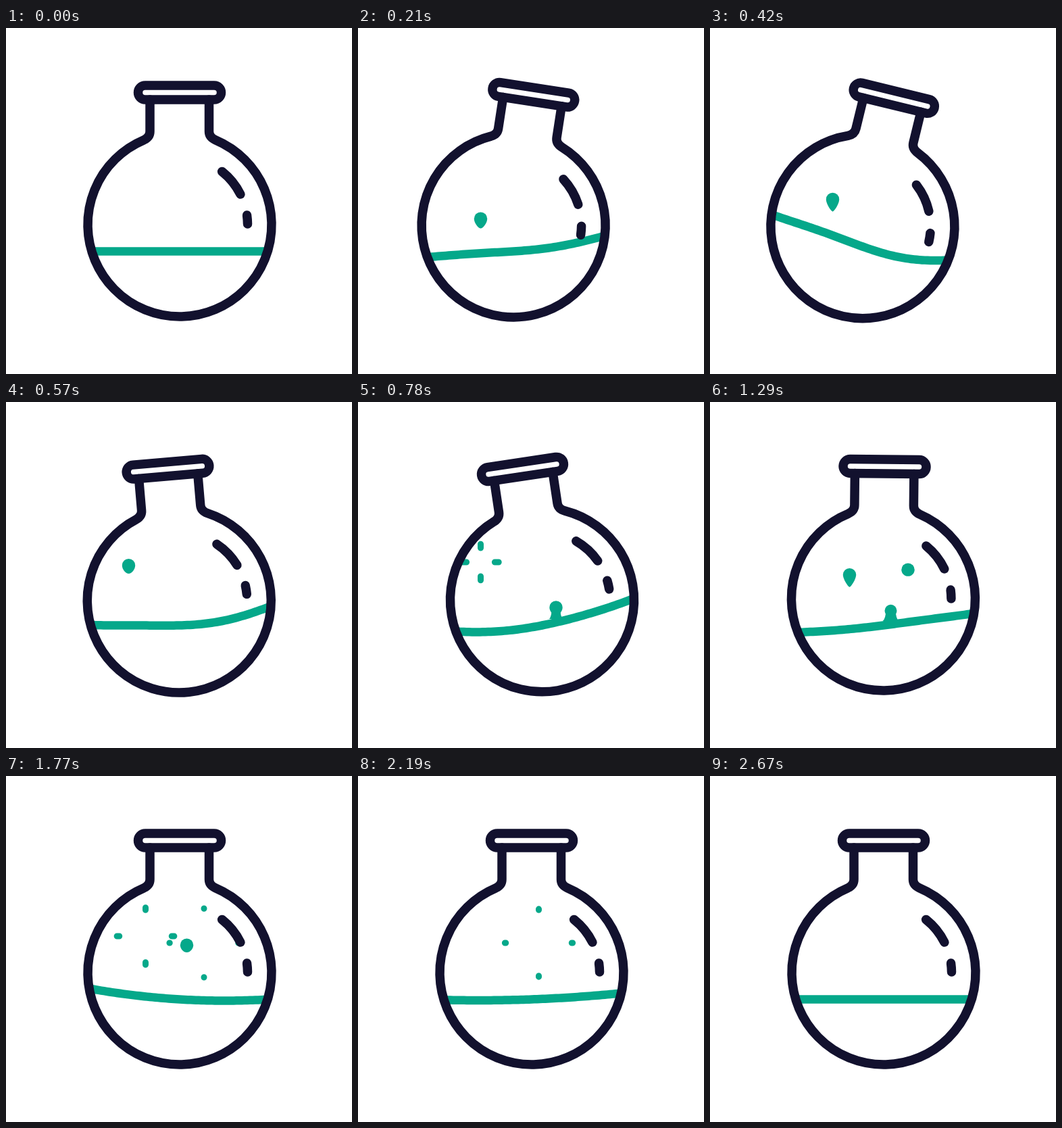
Animation of 512 by 512 pixels, one loop 3200 ms. Source, as an HTML page with a canvas:

```html
<!DOCTYPE html>
<html lang="en">
<head>
<meta charset="utf-8">
<title>Flask</title>
<style>
  html, body { margin: 0; width: 100%; height: 100%; overflow: hidden; background: #fff; }
  canvas { display: block; width: 512px; height: 512px; }
</style>
</head>
<body>
<canvas id="stage" width="512" height="512"></canvas>
<script>
const ctx = document.getElementById('stage').getContext('2d');
const LOOP = 3200, STEP = 30;
const INK = '#12112e', GREEN = '#05a88a';
const CX = 257, CY = 291, RADIUS = 136, LEVEL = 330.5;
const RISE_TIME = 740, BURST_START = 700, LIFE = 1250;

const clamp = v => Math.max(0, Math.min(1, v));
const hump = v => Math.sin(Math.PI * clamp(v));

// Swings from rest through each [time, extreme], easing in and out.
const swing = (...peaks) => t => {
  let time = 0, value = 0;
  for (const [nextTime, next] of peaks) {
    if (t < nextTime) {
      const p = (t - time) / (nextTime - time);
      return value + (next - value) * (1 - Math.cos(Math.PI * p)) / 2;
    }
    [time, value] = [nextTime, next];
  }
  return value;
};

const shiftX = swing([330, -38], [720, 17], [1040, -1], [1600, 0]);
const shiftY = swing([540, 3], [1100, 0]);
const tilt = swing([380, 15], [660, -11], [1060, 1], [1600, 0]);

const slope = swing([170, -18], [400, 33], [690, -38], [960, 24], [1320, -14], [1720, 8], [2100, -5], [2640, 0]);
const bow = swing([420, -12], [900, -13.5], [1290, -3], [1770, -7], [2640, 0]);
const ripple = swing([420, 4], [960, -2.3], [1500, 0]);
const heave = t => -7 * hump((t - 270) / 300);

const drops = [
  { x: 181.5, y: 237, born: 0 },
  { x: 293, y: 247, born: 635 },
  { x: 206.5, y: 237, born: 890 },
  { x: 267.5, y: 247, born: 1170 }
];

function strokeStyle(color, width, cap) {
  ctx.strokeStyle = color;
  ctx.lineWidth = width;
  ctx.lineCap = cap;
}

function drawSurface(surface, cx) {
  strokeStyle(GREEN, 12.5, 'butt');
  ctx.beginPath();
  for (let x = cx - 140; x <= cx + 140; x += 4) ctx.lineTo(x, surface(x));
  ctx.stroke();
}

// A circle whose lower half stretches to a tip.
function drawHead(x, y, r, stretch) {
  const tip = y + r * (1 + stretch), side = y + r * (0.55 + 0.2 * stretch);
  const blunt = r * (0.55 - 0.4 * stretch);
  ctx.beginPath();
  ctx.arc(x, y, r, Math.PI, 0);
  ctx.bezierCurveTo(x + r, side, x + blunt, tip, x, tip);
  ctx.bezierCurveTo(x - blunt, tip, x - r, side, x - r, y);
  ctx.fill();
}

function drawNeck(x, top, base, half) {
  const waist = half * 0.62;
  ctx.beginPath();
  ctx.moveTo(x - half, base);
  ctx.quadraticCurveTo(x - waist, base - 4, x - waist, top);
  ctx.lineTo(x + waist, top);
  ctx.quadraticCurveTo(x + waist, base - 4, x + half, base);
  ctx.fill();
}

function drawBurst(x, y, age) {
  const rest = 1 - (age - BURST_START) / (LIFE - BURST_START);
  const r = 51 * (1 - rest ** 4), half = 4 * rest ** 2;
  strokeStyle(GREEN, 9 * clamp((LIFE - age) / 100), 'round');
  ctx.beginPath();
  for (const [dx, dy] of [[0, -1], [1, 0], [0, 1], [-1, 0]]) {
    ctx.moveTo(x + dx * (r - half), y + dy * (r - half));
    ctx.lineTo(x + dx * (r + half), y + dy * (r + half));
  }
  ctx.stroke();
}

function drawDrop({ x, y, born }, t, surface) {
  const age = t - born;
  if (age <= 0 || age >= LIFE) return;
  const headY = y + 88 * clamp(1 - age / RISE_TIME) ** 2;
  const r = 9.7 * clamp(age / 130) * clamp((760 - age) / 70);
  const neck = 12 * hump((age - 70) / 110);
  ctx.fillStyle = GREEN;
  if (neck > 0.5) drawNeck(x, headY, surface(x) - 5, neck);
  if (r > 0) drawHead(x, headY, r, 0.9 * hump((age - 120) / 500));
  if (age > RISE_TIME) drawBurst(x, y, age);
}

// Drawn around the centre of the bulb.
function drawFlask() {
  strokeStyle(INK, 13.5, 'round');
  const mouthX = 53, mouthY = -Math.sqrt(RADIUS ** 2 - mouthX ** 2);
  ctx.beginPath();
  ctx.moveTo(-44, -185);
  ctx.lineTo(-44, -138);
  ctx.quadraticCurveTo(-44, -129.5, -mouthX, mouthY);
  ctx.arc(0, 0, RADIUS, Math.atan2(mouthY, -mouthX), Math.atan2(mouthY, mouthX), true);
  ctx.quadraticCurveTo(43.5, -129.5, 43.5, -138);
  ctx.lineTo(43.5, -185);
  ctx.stroke();

  ctx.beginPath();
  ctx.roundRect(-61.5, -206, 123, 21, 10.5);
  ctx.stroke();

  for (const [from, to] of [[-0.898, -0.464], [-0.14, -0.01]]) {
    ctx.beginPath();
    ctx.arc(0, 0, 100.5, from, to);
    ctx.stroke();
  }
}

function draw(t) {
  const cx = CX + shiftX(t), cy = CY + shiftY(t);
  const surface = x => {
    const u = (x - cx) / 125;
    return LEVEL + heave(t) + slope(t) * u + bow(t) * u * u + ripple(t) * Math.sin(Math.PI * u);
  };
  ctx.fillStyle = '#fff';
  ctx.fillRect(0, 0, 512, 512);

  ctx.save();
  ctx.beginPath();
  ctx.arc(cx, cy, RADIUS + 2, 0, 2 * Math.PI);
  ctx.clip();
  drawSurface(surface, cx);
  drops.forEach(drop => drawDrop(drop, t, surface));
  ctx.restore();

  ctx.save();
  ctx.translate(cx, cy);
  ctx.rotate(tilt(t) * Math.PI / 180);
  drawFlask();
  ctx.restore();
}

const start = performance.now();
function frame() {
  const t = (performance.now() - start) % LOOP;
  draw(Math.floor(t / STEP) * STEP);
  requestAnimationFrame(frame);
}
frame();
</script>
</body>
</html>
```
